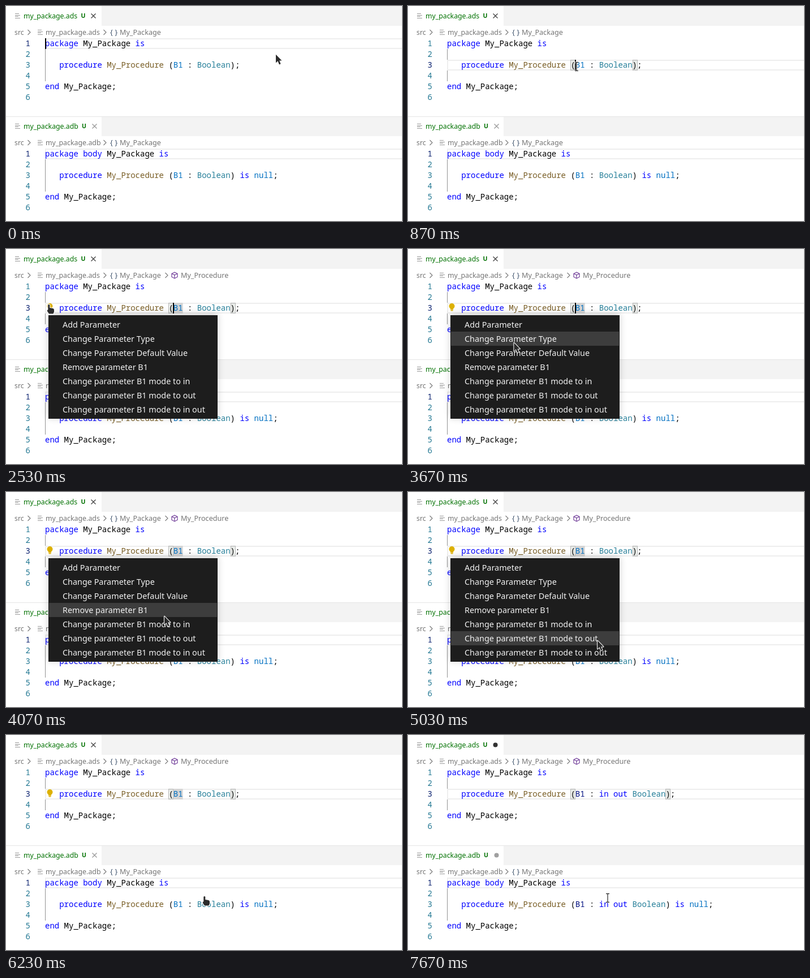
Animation, 700 px wide and 380 px high, one loop 7.91 s. Source, as an HTML page with a canvas:

```html
<!DOCTYPE html>
<html lang="en">
<head>
<meta charset="utf-8">
<title>Change parameter mode</title>
<style>
  html, body { margin: 0; width: 100%; height: 100%; overflow: hidden; background: #fff; }
  canvas { display: block; width: 700px; height: 380px; }
</style>
</head>
<body>
<canvas id="stage"></canvas>
<script>
const LOOP = 7910, W = 700, H = 380;
const canvas = document.getElementById('stage');
const ctx = canvas.getContext('2d');
const dpr = window.devicePixelRatio || 1;
canvas.width = W * dpr;
canvas.height = H * dpr;

const MONO = '14px "Noto Sans Mono", monospace';
const sans = (size, weight = 400) => `${weight} ${size}px "Noto Sans", sans-serif`;
const CHAR = 8.4, LEFT = 69, LINE = 19, CODE_TOP = 57, GROUP = 195;
const C = {
  key: '#0000ff', name: '#000000', proc: '#795e26', type: '#267f99',
  fixed: '#0070c1', variable: '#001080', git: '#007100',
  num: '#237893', numOn: '#0b216f', crumb: '#757575'
};
const CLICK = 870, HINTS = 1200, MENU_OPEN = 2530, MENU_CLOSE = 6230, EDIT = 6430;
const ITEMS = [
  'Add Parameter', 'Change Parameter Type', 'Change Parameter Default Value',
  'Remove parameter B1', 'Change parameter B1 mode to in',
  'Change parameter B1 mode to out', 'Change parameter B1 mode to in out'
];

// Pointer moves: start, end, target x, target y, bend
const MOVES = [
  [30, 670, 298, 107, 14],
  [1600, 2200, 78, 101, 3],
  [3270, 4030, 280, 219, 0],
  [4070, 4300, 300, 232, 0],
  [4730, 5030, 335, 262, 0],
  [5430, 5500, 372, 280, 0],
  [5500, 5570, 359, 287, 0],
  [5930, 6000, 353, 288, 0]
];
// Times at which the caret toggles, beginning visible
const BLINKS = [500, CLICK, 1330, 2030, 3030, 3530, 4030, 4500, 5030, 5530, 6000, 6530, 7030, 7170, 7670];

const ease = k => k * k * (3 - 2 * k);
const colX = col => LEFT + col * CHAR;

function rect(x, y, w, h, fill) {
  ctx.fillStyle = fill;
  ctx.fillRect(x, y, w, h);
}

function text(str, x, y, font, fill) {
  ctx.font = font;
  ctx.fillStyle = fill;
  ctx.fillText(str, x, y);
}

function poly(points, stroke, width, close) {
  ctx.beginPath();
  points.forEach(([x, y]) => ctx.lineTo(x, y));
  if (close) ctx.closePath();
  ctx.strokeStyle = stroke;
  ctx.lineWidth = width;
  ctx.stroke();
}

function dot(x, y, r, fill) {
  ctx.beginPath();
  ctx.arc(x, y, r, 0, Math.PI * 2);
  ctx.fillStyle = fill;
  ctx.fill();
}

function fileIcon(x, y) {
  [7, 9, 6, 9].forEach((w, i) => rect(x, y + Math.round(i * 2.7), w, 1, '#9a9a9a'));
}

function chevron(x, y) {
  poly([[x, y - 4.5], [x + 4.5, y], [x, y + 4.5]], '#777', 1.1);
}

function cube(x, y) {
  poly([[x, y - 5.5], [x + 5, y - 3], [x + 5, y + 3], [x, y + 5.5], [x - 5, y + 3], [x - 5, y - 3]], '#652d90', 1.1, true);
  poly([[x - 5, y - 3], [x, y - .5], [x + 5, y - 3]], '#652d90', 1.1);
  poly([[x, y - .5], [x, y + 5.5]], '#652d90', 1.1);
}

function tabBar(y, file, markX, closeX, closeColor, dirty) {
  rect(169, y, W - 169, 35, '#f3f3f3');
  fileIcon(16, y + 13);
  text(file, 31, y + 21.5, sans(12.3), C.git);
  text('U', markX, y + 21, sans(10.5, 600), C.git);
  const cy = y + 17.5;
  if (dirty) {
    dot(closeX, cy, 4, closeColor);
  } else {
    poly([[closeX - 4, cy - 4], [closeX + 4, cy + 4]], closeColor, 1.2);
    poly([[closeX + 4, cy - 4], [closeX - 4, cy + 4]], closeColor, 1.2);
  }
}

function breadcrumbs(y, file, deep) {
  const base = y + 50.5, mid = y + 46.5;
  text('src', 15, base, sans(12.4), C.crumb);
  chevron(38.5, mid);
  fileIcon(56, y + 42);
  text(file, 70, base, sans(12.4), C.crumb);
  chevron(172.5, mid);
  text('{', 184, base, sans(12.5), '#42566f');
  text('}', 192.5, base, sans(12.5), '#42566f');
  text('My_Package', 201, base, sans(12.6), C.crumb);
  if (deep) {
    chevron(281.5, mid);
    cube(298, mid);
    text('My_Procedure', 309, base, sans(12.6), C.crumb);
  }
}

function codeLine(top, row, col, tokens) {
  for (const [str, color] of tokens) {
    text(str, colX(col), top + row * LINE + 14, MONO, color);
    col += str.length;
  }
}

function bracket(col, y) {
  rect(colX(col), y, CHAR, LINE, 'rgba(50,80,50,0.1)');
  ctx.strokeStyle = '#b9b9b9';
  ctx.lineWidth = 1;
  ctx.strokeRect(Math.round(colX(col)) + .5, y + .5, 8, LINE - 1);
}

function editor(y, isBody, row, hints, edited) {
  const top = y + CODE_TOP, rowY = top + row * LINE;
  rect(LEFT, top + LINE, 1, LINE * 3, '#939393');
  ctx.strokeStyle = '#eeeeee';
  ctx.lineWidth = 2;
  ctx.strokeRect(LEFT + 1, rowY + 1, W, LINE - 2);
  if (row === 2) {
    bracket(26, rowY);
    bracket(edited ? 46 : 39, rowY);
    if (hints && !edited) rect(colX(27), rowY, CHAR * 2, LINE, '#d5d5d5');
  }
  for (let i = 0; i < 6; i++) {
    text(String(i + 1), 34.5, top + i * LINE + 14, MONO, i === row ? C.numOn : C.num);
  }
  codeLine(top, 0, 0, [[isBody ? 'package body ' : 'package ', C.key], ['My_Package ', C.name], ['is', C.key]]);
  codeLine(top, 2, 3, [
    ['procedure ', C.key], ['My_Procedure ', C.proc], ['(', C.name],
    ['B1', edited ? C.variable : C.fixed], [' : ', C.name],
    [edited ? 'in out ' : '', C.key], ['Boolean', C.type], [')', C.name],
    [isBody ? ' is ' : '', C.key], [isBody ? 'null' : '', C.fixed], [';', C.name]
  ]);
  codeLine(top, 4, 0, [['end ', C.key], ['My_Package;', C.name]]);
}

function bulb() {
  dot(77.5, 101, 5, '#ddb100');
  rect(75, 104, 5, 3.5, '#ddb100');
  rect(75.5, 108, 4, 1.5, '#ddb100');
}

function menu(p, hover) {
  ctx.save();
  ctx.shadowColor = 'rgba(0,0,0,0.2)';
  ctx.shadowBlur = 12 * dpr;
  ctx.shadowOffsetY = -2 * dpr;
  rect(75, 117, 299, 183, '#1d1d1d');
  ctx.restore();
  const pick = Math.floor((p.y - 121) / 25);
  ITEMS.forEach((label, i) => {
    const y = 121 + i * 25;
    if (hover && i === pick) rect(76, y, 297, 25, '#3d3d3d');
    text(label, 100, y + 18, sans(14.4), '#f2f2f2');
  });
}

function outlined(path) {
  ctx.lineJoin = 'round';
  ctx.lineWidth = 2;
  ctx.strokeStyle = '#fff';
  ctx.stroke(path);
  ctx.fillStyle = '#2b2b2b';
  ctx.fill(path);
}

const SHAPES = {
  arrow: new Path2D('M0 .8V15.5L3.5 12.3L6 18.4L8.6 17.3L6.2 11.5H10.5Z'),
  hand: new Path2D('M-3.7 -2Q-2.2 -4 -.7 -2V3L5 4Q7 4.5 7 6.5V10L5.5 13.5H-2L-5 9Q-6 7 -3.7 6.5Z')
};

function pointer(p, kind) {
  ctx.save();
  ctx.translate(p.x, p.y);
  if (kind === 'beam') {
    const beam = (w, color) => {
      poly([[0, -7], [0, 7]], color, w);
      [-7.5, 7.5].forEach(y => poly([[-3, y], [3, y]], color, w));
    };
    beam(2.8, 'rgba(255,255,255,0.8)');
    beam(1.2, '#222');
  } else {
    outlined(SHAPES[kind]);
  }
  ctx.restore();
}

function pointerAt(t) {
  let x = 477, y = 85;
  for (const [a, b, tx, ty, bend] of MOVES) {
    if (t < a) break;
    const k = ease(Math.min(1, (t - a) / (b - a)));
    x += (tx - x) * k;
    y += (ty - y) * k + bend * Math.sin(Math.PI * k);
  }
  return { x, y };
}

function pointerKind(t, p) {
  if (t < 30) return 'arrow';
  if (t < MENU_OPEN) return p.x < 87 ? 'hand' : 'beam';
  if (t < 3270) return 'hand';
  if (t < MENU_CLOSE) return 'arrow';
  return t < 6270 ? 'hand' : 'beam';
}

function draw(t) {
  const clicked = t >= CLICK, hints = t >= HINTS, edited = t >= EDIT;
  const p = pointerAt(t);
  ctx.setTransform(dpr, 0, 0, dpr, 0, 0);
  rect(0, 0, W, H, '#fff');

  tabBar(0, 'my_package.ads', 132.5, 154.5, edited ? '#333' : '#424242', edited);
  breadcrumbs(0, 'my_package.ads', hints);
  editor(0, false, clicked ? 2 : 0, hints, edited);

  tabBar(GROUP, 'my_package.adb', 134, 156.5, edited ? '#a0a0a0' : '#9a9a9a', edited);
  rect(0, GROUP, W, 1, '#e5e5e5');
  breadcrumbs(GROUP, 'my_package.adb', false);
  editor(GROUP, true, 0, false, edited);

  if (hints && !edited) bulb();
  const caretOn = BLINKS.filter(b => b <= t).length % 2 === 0;
  if (caretOn) {
    if (clicked) rect(edited ? 296 : 295, 95, 2, LINE, '#000');
    else rect(LEFT, CODE_TOP, 2, LINE, '#000');
  }
  if (t >= MENU_OPEN && t < MENU_CLOSE) menu(p, t >= 3270);
  pointer(p, pointerKind(t, p));
}

const start = performance.now();
function tick() {
  draw((performance.now() - start) % LOOP);
  requestAnimationFrame(tick);
}
tick();
</script>
</body>
</html>
```
